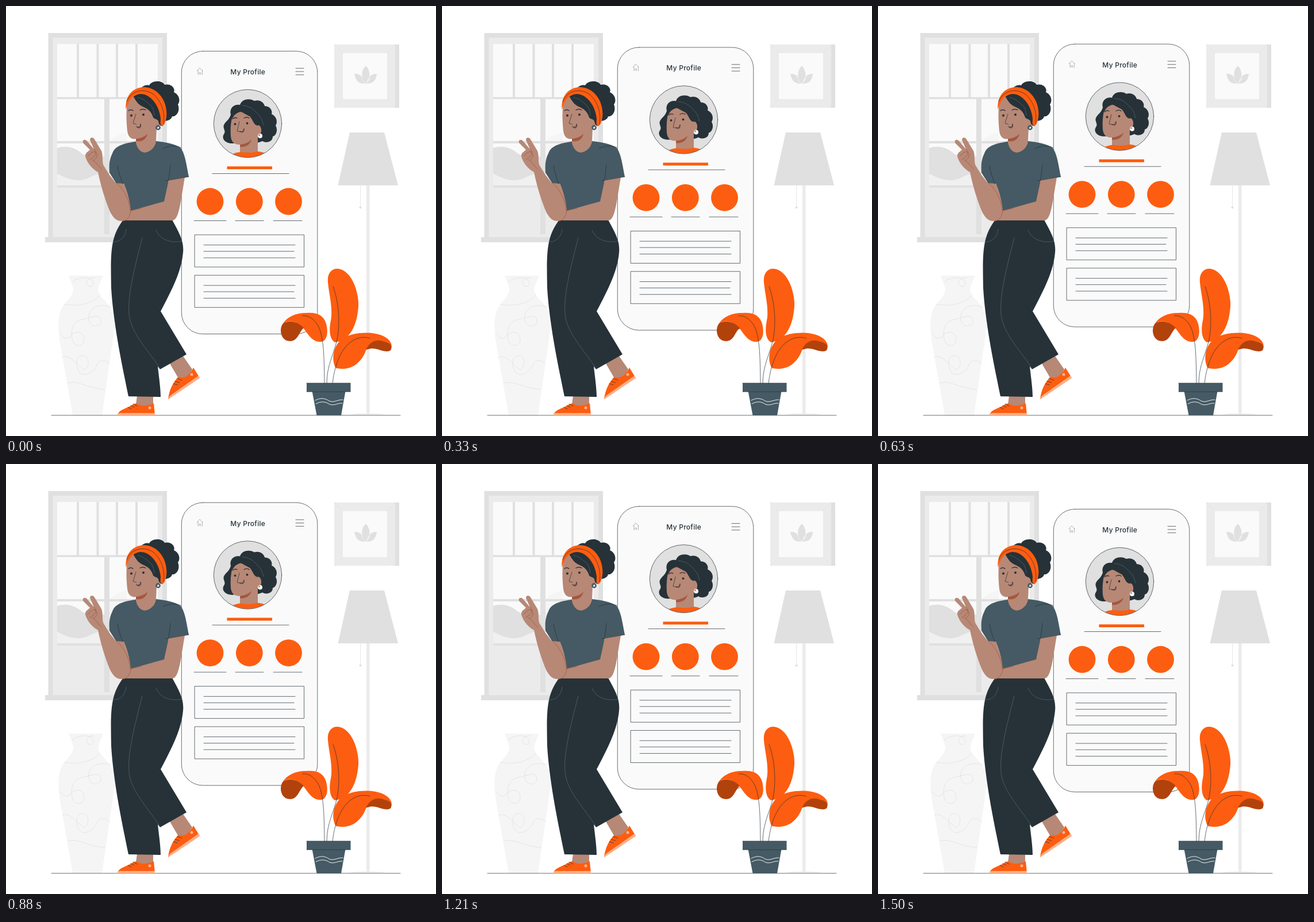
Recreate the animation shown at these times as an HTML page. Size 748 px wide and 748 px high, loop 1540 ms.

```html
<!DOCTYPE html>
<html lang="en">
<head>
<meta charset="utf-8">
<title>My Profile</title>
<style>
  html, body { margin: 0; width: 100%; height: 100%; overflow: hidden; background: #fff; }
  svg { display: block; width: 100%; height: 100%; }
  path, rect, circle { stroke-linecap: round; stroke-linejoin: round; }
  .pale { fill: #fafafa; }
  .soft { fill: #ebebeb; }
  .grey { fill: #e0e0e0; }
  .dark { fill: #263238; }
  .slate { fill: #455a64; }
  .skin { fill: #b78876; }
  .shade { fill: #a4573f; }
  .orange { fill: #fd5d10; }
  .rust { fill: #b2420c; }
  .sole { fill: #ffb08a; }
  .ink { fill: none; stroke: #263238; stroke-width: .7; }
  .bold { fill: none; stroke: #263238; stroke-width: 1.3; }
  .seam { fill: none; stroke: #566a74; stroke-width: .7; }
  .fold { fill: none; stroke: #a4573f; stroke-width: .8; }
  .etch { fill: none; stroke: #e0e0e0; stroke-width: .8; }
  text { font: 500 12px Inter, "Open Sans", sans-serif; fill: #263238; text-anchor: middle; }
</style>
</head>
<body>
<svg viewBox="0 0 748 748">
  <defs>
    <clipPath id="round"><circle cx="420.5" cy="204.5" r="58.7"/></clipPath>
  </defs>

  <g id="window">
    <path class="grey" d="M73.500 47H280V402H73.500Z"/>
    <path class="soft" d="M81.500 55H272V402H81.500Z"/>
    <path class="pale" d="M89 66H264V312H89Z"/>
    <path fill="#f5f5f5" d="M180 236C188 228 197 222 210 220V312H180Z"/>
    <path fill="#f0f0f0" d="M89 290H171V312H89Z"/>
    <path class="grey" d="M89 247C105 242 120 246 131 256C145 265 155 263 171 262V290C150 292 145 303 125 303C108 303 100 296 89 292Z"/>
    <path class="soft" d="M89 316H264V398H89Z"/>
    <path class="grey" d="M123 66h4v93h-4zM157.500 66h4v93h-4zM191 66h4v93h-4zM225 66h4v93h-4zM89 158.500h175v3.500H89zM171 162h9v235h-9zM89 235h175v4H89zM89 312h175v4H89z"/>
    <path class="grey" d="M68 402H286V411H68Z"/>
  </g>

  <g id="picture">
    <path class="soft" d="M571 67H677V177H571Z"/>
    <path class="grey" d="M677 67H684V177H677Z"/>
    <path class="pale" d="M586 82H663V162H586Z"/>
    <path class="etch" d="M571 67L586 82M677 67L663 82M571 177L586 162M677 177L663 162"/>
    <path class="grey" d="M626 104C634 112 635 126 626 135C617 126 617 112 626 104ZM606 118C616 117 622 124 625 135C613 136 608 129 606 118ZM645 118C636 117 629 124 627 135C638 136 644 129 645 118Z"/>
    <path fill="none" stroke="#f5f5f5" d="M619 117C617 125 620 131 626 135C632 131 634 125 633 117"/>
  </g>

  <g id="lamp">
    <path class="soft" d="M627 312H632.500V709H627ZM598 711C606 708 650 708 660 711Z"/>
    <path class="grey" d="M598 220H658L682 312H577.500Z"/>
    <path class="etch" d="M616.500 312V348"/>
    <circle class="grey" cx="616.500" cy="350.500" r="2"/>
  </g>

  <g id="vase">
    <path fill="#f5f5f5" d="M109 469H169L161 488C158 500 166 506 175 516C189 531 190 550 186 580L167 712H116L93 580C89 550 91 530 104 516C114 505 119 498 116 487Z"/>
    <path class="etch" d="M114 481C125 470 149 470 152 481C154 490 141 490 140 482C139 475 148 472 154 473M102 519C130 524 155 515 163 503M183 524C160 515 141 527 144 546C148 562 166 558 165 547C163 533 146 543 134 545C117 548 112 562 115 580C118 594 136 594 136 580C136 565 120 564 112 574C106 581 100 578 95 570M98 612C108 603 122 622 136 633C147 625 144 608 133 608C122 608 120 625 127 636C135 648 152 637 158 625C162 613 174 616 180 622M108 656C125 650 140 665 172 667"/>
  </g>

  <path class="ink" d="M79 712H686"/>

  <g id="phone">
    <rect x="305.300" y="78.500" width="236.500" height="492" rx="37" fill="#fafafa" stroke="#263238" stroke-width=".7"/>
    <text x="420.700" y="119" letter-spacing=".25">My Profile</text>
    <path class="ink" d="M332 113L337 107.500L342 113M341.500 112V119.500M334 112V119M336 119V116H338.500V119" opacity=".5"/>
    <path class="ink" d="M504 108.300H518M504 114H518M504 119.700H518"/>

    <circle class="grey" cx="420.500" cy="204.500" r="59.200"/>
    <g clip-path="url(#round)">
      <path class="dark" d="M391 189C388 177 397 170 407 172C410 161 425 160 432 165C441 162 449 168 450 174C460 174 464 183 462 188C471 192 473 202 469 208C474 217 469 226 464 227C464 237 452 239 446 235C436 240 424 238 418 233L396 239C382 240 374 231 379 223C384 217 375 212 380 205C384 199 388 198 391 189Z"/>
      <path class="skin" d="M394 190C396 182 407 178 413 182C422 184 428 194 435 207C443 205 447 216 442 224L438 228V258H407V241C397 242 392 236 391 227C390 215 391 202 394 190Z"/>
      <path class="dark" d="M393 198C389 184 398 174 411 176C427 178 435 194 439 208C431 209 430 198 424 192C416 188 412 185 408 184C400 186 396 190 393 198Z"/>
      <path class="shade" d="M407 241C416 240 423 237 427 232C425 242 416 246 407 245Z"/>
      <path class="orange" d="M380 270C387 259 397 255 408 254C419 256 430 255 438 253C450 254 458 259 464 270Z"/>
      <path class="seam" d="M411 173C428 174 434 184 440 190C446 196 446 202 448 207"/>
      <path class="ink" d="M406 201L402 217.500L408 219"/>
      <path class="shade" stroke="#263238" stroke-width=".8" d="M407 218C411 220 413 217 414 213C415 220 411 221 407 218Z"/>
      <path class="bold" d="M395 196Q398 193 402 195M414 195Q419 192 423 195"/>
      <circle class="dark" cx="398.500" cy="205.500" r="1.900"/>
      <circle class="dark" cx="419.500" cy="204" r="1.900"/>
      <circle class="pale" cx="442" cy="226" r="4"/>
      <circle class="skin" cx="440.500" cy="224.500" r="1.500"/>
    </g>
    <circle class="ink" cx="420.500" cy="204.500" r="59.200"/>

    <path class="orange" d="M384.500 279H463V284H384.500Z"/>
    <path class="ink" d="M359 291.500H492M327 373.500H383M399 373.500H448M465 373.500H515"/>
    <circle class="orange" cx="355" cy="340" r="23.400"/>
    <circle class="orange" cx="423.300" cy="340" r="23.400"/>
    <circle class="orange" cx="491.500" cy="340" r="23.400"/>
    <g id="card">
      <rect class="ink" x="328.500" y="398" width="190" height="56"/>
      <path class="ink" d="M344 415.700H503M344 426.700H501M344 438H503"/>
    </g>
    <use href="#card" y="70.300"/>
  </g>

  <g id="plant">
    <path class="orange" d="M572 585C562 579 562 562 565 547C569 527 562 502 560 481C558 463 569 454 582 458C604 465 614 501 613 522C611 554 599 582 572 585Z"/>
    <path class="orange" d="M482 552C490 540 505 534 522 534C541 532 553 538 557 553C561 569 558 582 549 584C533 586 525 570 517 560C508 549 492 545 482 552Z"/>
    <path class="rust" d="M482 552C474 562 478 583 494 583C508 583 510 566 518 560C507 548 492 546 482 552Z"/>
    <path class="orange" d="M574 630C565 616 569 590 586 578C605 566 640 566 656 574C669 580 674 590 669 599C655 596 638 590 627 597C620 617 604 636 574 630Z"/>
    <path class="rust" d="M626 598C632 584 645 578 658 584C668 586 673 590 669 599C659 605 646 594 634 596Z"/>
    <path class="ink" d="M554 656C553 625 555 570 540 552C533 543 526 538 516 539M558 656C558 625 570 607 576 580C583 543 576 507 569 488M568 656C573 615 587 590 607 580C618 575 628 576 633 578"/>
    <path class="slate" d="M532.500 670H590.500L583 712H540.500Z"/>
    <path class="slate" d="M523 656H599.500V671H523Z"/>
    <path class="ink" d="M523 671H599M523 656H599"/>
    <path fill="none" stroke="#fff" stroke-width=".9" d="M538 686C547 681 555 682 562 687C570 691 578 684 586 685M539 692C548 687 556 688 563 693C571 696 578 690 585 691"/>
  </g>

  <g id="woman">
    <path class="skin" d="M228 678H256V694C246 701 236 701 226 693ZM285 622L308 609L324 632C318 646 309 651 299 646Z"/>
    <path class="orange" d="M194 712C195 704 205 701 214 697C219 694 222 692 227 691C236 698 248 695 257 691L259 712Z"/>
    <path class="sole" d="M194 712C194 709 196 708 199 708H259V712Z"/>
    <path class="orange" d="M282 684C284 667 291 654 300 645C311 650 321 640 326 629L337 647L285 682Z"/>
    <path class="sole" d="M282 684C283 680 285 678 288 676L335 643L337 647Z"/>
    <path class="ink" d="M212 698L218 701M217 695L223 698M221 692L228 696M291 657L298 659M294 653L302 655M298 648L306 651"/>
    <circle class="sole" cx="250" cy="699" r="2.500"/>
    <circle class="sole" cx="323" cy="641" r="2.500"/>

    <path class="dark" d="M204 372H289C301 394 310 409 308 429C305 465 285 500 269 531L314 606L268 632L264 627C266 645 269 665 269 680L213 679C206 643 187 560 183 490C182 430 181 402 204 372Z"/>
    <path class="seam" d="M237 403C229 436 208 508 215 543C223 577 249 600 268 631M187 410C200 411 208 400 209 388M261 390C268 407 287 413 306 409"/>

    <path class="slate" d="M230 235C211 238 194 241 187 252C180 266 179 274 180 290L192 309L205 309C212 325 216 343 215 360L277 345L283 303L318 297C314 278 312 258 304 247C293 239 276 237 261 235C258 240 234 242 230 235Z"/>
    <path class="skin" d="M283 303L275 340L214 357L205 373H290C301 371 303 345 311 298Z"/>
    <path class="skin" d="M138 262C137 255 144 253 146 250L134 238C132 233 138 231 141 235L153 249L146 233C146 228 152 228 154 232L166 252C169 260 167 267 169 276L180 294L191 308L205 309C212 325 216 342 217 356C216 366 211 374 201 374C190 374 186 366 182 360C173 340 165 313 160 289C151 284 142 275 138 262Z"/>
    <path class="fold" d="M191 307C207 320 216 342 216 356M217 356C216 366 211 373 204 374M217 356L235 352M143 261C147 256 151 252 156 254C158 261 149 264 146 267M154 254C161 257 159 264 152 269M150 267C158 272 160 279 166 283M153 249L157 254"/>
    <path class="ink" d="M194 278C196 291 200 301 203 309M283 303L286 277M273 248C282 243 295 242 304 246M278 304L318 297"/>

    <path class="dark" d="M231 150C234 139 244 136 249 138C254 129 271 129 276 137C288 134 295 144 292 150C303 155 303 167 299 171C304 184 295 193 289 192C287 200 276 201 270 199L255 165Z"/>
    <path class="skin" d="M211 166C216 151 247 151 261 187C268 193 271 207 262 213L261 236C259 248 248 255 241 255C233 254 228 247 226 238V231C218 233 212 227 211 217C209 200 209 181 211 166Z"/>
    <path class="shade" d="M226 231C235 230 242 227 246 222C244 233 235 237 226 235Z"/>
    <path class="dark" d="M221 156C227 152 232 152 238 153C257 156 270 176 273 208C269 210 266 207 265 200C262 196 259 197 256 194C253 184 248 180 240 176C232 173 227 168 221 156Z"/>
    <path class="orange" d="M208.500 180C207 157 219 142 240 141C266 142 282 168 279 193C278 200 276 207 272 209C267 207 269 202 269 196C267 174 252 153 234 153C221 154 213 164 208.500 180Z"/>
    <path class="ink" d="M210 166C219 145 242 143 257 154C271 167 277 185 274 205"/>
    <path class="seam" d="M229 159C242 162 245 168 251 172C257 178 257 185 258 190"/>
    <path class="ink" d="M226 188L221 204L227 206"/>
    <path class="shade" stroke="#263238" stroke-width=".8" d="M227 210C231 212 234 209 234 205C236 211 232 215 227 210Z"/>
    <path class="bold" d="M213 182Q217 179 221 182M233 181Q238 178 243 181"/>
    <circle class="dark" cx="218" cy="190.500" r="2"/>
    <circle class="dark" cx="239" cy="189" r="2"/>
    <circle cx="264.500" cy="211.500" r="3.200" fill="none" stroke="#455a64" stroke-width="2.400"/>
  </g>
</svg>
<script>
  const LOOP = 1540, FPS = 24, CYCLE = 1500, PEAK = 727;
  const phone = document.getElementById('phone');

  // The phone floats up and down at constant speed, stepped at 24 fps.
  function draw(now) {
    const step = Math.floor((now % LOOP + 4.5) * FPS / 1000);
    const t = Math.min(step, 36) * 1000 / FPS % CYCLE;
    const away = Math.abs(t - PEAK);
    const gap = Math.min(away, CYCLE - away);
    phone.setAttribute('transform', `translate(0 ${(-14.3 + 0.0197 * gap).toFixed(2)})`);
    requestAnimationFrame(draw);
  }
  draw(performance.now());
</script>
</body>
</html>
```
